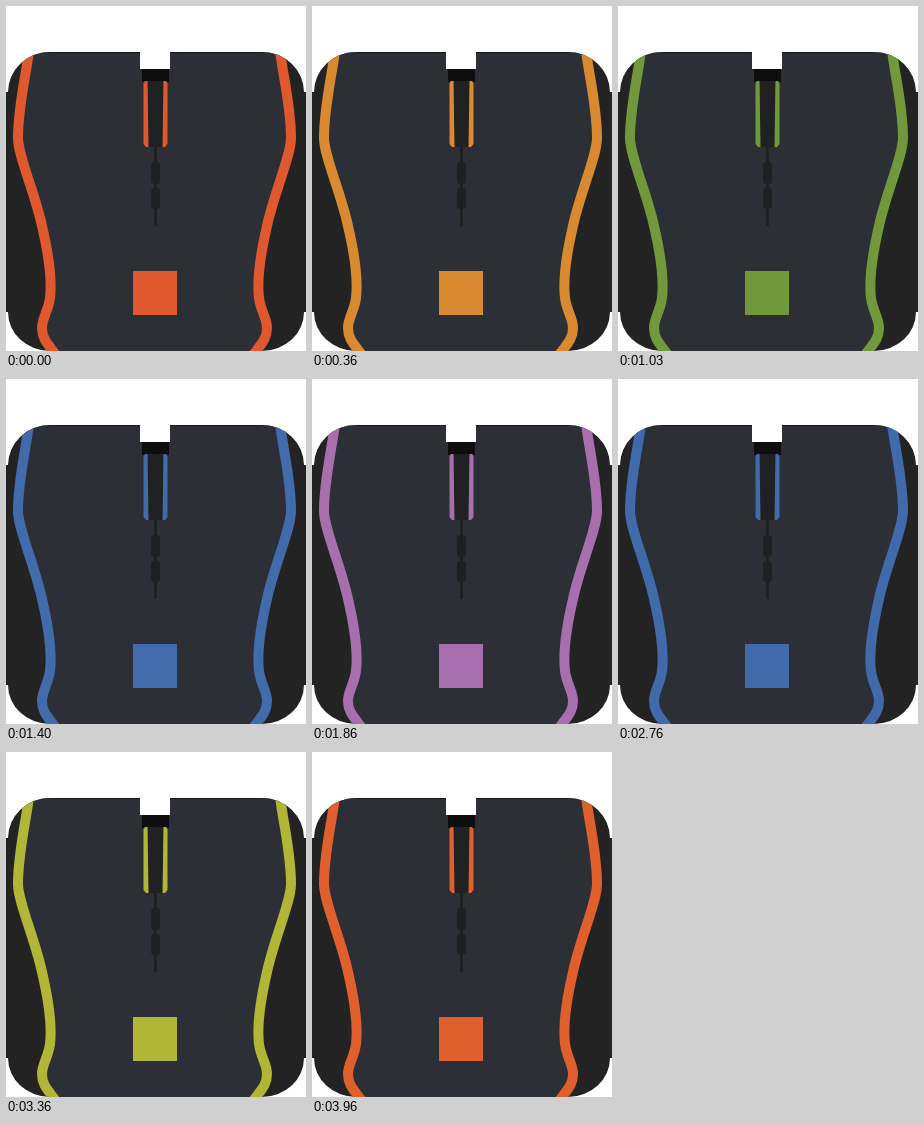
Recreate the animation shown at these times as an HTML page. Size 300 by 345 pixels, loop 4000 ms.

```html
<!DOCTYPE html>
<html lang="en">
<head>
<meta charset="utf-8">
<title>Mouse with colour-cycling lights</title>
<style>
  html, body {
    margin: 0;
    width: 100%;
    height: 100%;
    overflow: hidden;
    background: #fff;
  }
  svg {
    display: block;
    width: 300px;
    height: 345px;
    color: #e0582d;
    animation: glow 4s linear infinite;
  }
  .light { fill: currentColor; }
  .edge {
    fill: none;
    stroke: currentColor;
    stroke-width: 10;
  }
  @keyframes glow {
    0%, 100% { color: #e0582d; }
    20%   { color: #d0c434; }
    26.5% { color: #65943d; }
    35%   { color: #426bab; }
    46.5% { color: #a86fae; }
    52%   { color: #b072b0; }
    57.5% { color: #a86fae; }
    69%   { color: #406aaa; }
    79%   { color: #66943e; }
    86%   { color: #d0c434; }
  }
</style>
</head>
<body>
<svg viewBox="0 0 300 345" role="img" aria-label="Computer mouse with coloured lights">
  <defs>
    <clipPath id="shell">
      <path d="M44 46H256A42 40 0 0 1 298 86H300V306H298A42 39 0 0 1 256 345H44A42 39 0 0 1 2 306H0V86H2A42 40 0 0 1 44 46Z"/>
    </clipPath>
    <path id="side" d="M23 45C19 75 12 102 12 132C12 150 29 187 36 220C43 250 46 275 44 292C42 306 36 312 36 322C36 333 42 338 50 349"/>
    <path id="half" d="M23 45C19 75 12 102 12 132C12 150 29 187 36 220C43 250 46 275 44 292C42 306 36 312 36 322C36 333 42 338 50 349H150V45Z"/>
  </defs>

  <g clip-path="url(#shell)">
    <rect y="46" width="300" height="299" fill="#232324"/>
    <g fill="#2c2f35">
      <use href="#half"/>
      <use href="#half" transform="translate(297) scale(-1 1)"/>
    </g>
    <g class="edge">
      <use href="#side"/>
      <use href="#side" transform="translate(297) scale(-1 1)"/>
    </g>
    <path d="M44 46.500H256" stroke="#17181a"/>
  </g>

  <!-- Scroll wheel -->
  <rect x="134" y="45" width="30" height="18" fill="#fff"/>
  <rect x="136" y="63" width="27" height="13" fill="#0e0e0f"/>
  <rect x="142" y="75" width="15" height="66" fill="#202122"/>
  <path class="light" d="M139 75H141.500L142.500 141H140L137.500 138V77Z"/>
  <path class="light" d="M157.500 75H160L161.500 77V138L159 141H156.500Z"/>

  <!-- Centre seam and buttons -->
  <g fill="#1f2021">
    <rect x="148" y="141" width="3" height="79"/>
    <rect x="145" y="156" width="9" height="22" rx="3.500"/>
    <rect x="145" y="182" width="9" height="21" rx="3.500"/>
  </g>

  <!-- Emblem -->
  <rect class="light" x="127" y="265" width="44" height="44"/>
</svg>
</body>
</html>
```
